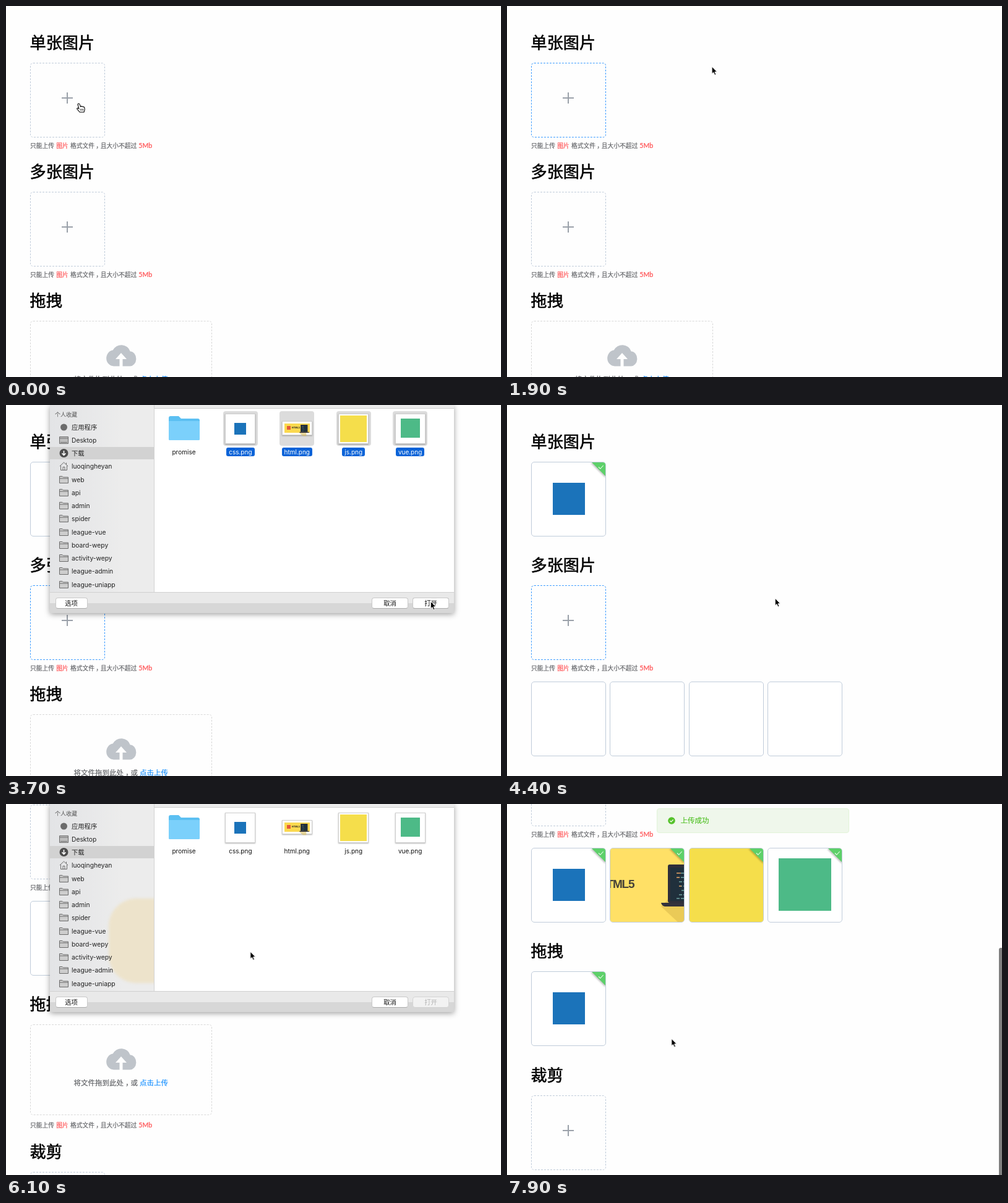
An HTML page for the animation above (8000 ms loop, 800 by 601 pixels).

```html
<!DOCTYPE html>
<html lang="zh">
<head>
<meta charset="utf-8">
<title>图片上传</title>
<style>
  html, body { margin: 0; width: 100%; height: 100%; overflow: hidden; background: #fefefe; }
  * { box-sizing: border-box; }
  #stage { position: relative; width: 800px; height: 601px; overflow: hidden;
    font-family: Lato, "Noto Sans CJK SC", "Noto Sans CJK", sans-serif; color: #606266; }
  #stage div, #stage svg, h1, p { position: absolute; margin: 0; white-space: nowrap; }
  #stage svg { overflow: visible; }

  /* every timeline shares one 8 s loop */
  .anim { animation: 8s step-end infinite both; }
  .smooth { animation: 8s ease-in-out infinite both; }

  /* page */
  h1 { left: 38.5px; font: 400 26.2px/30px "Noto Sans CJK SC", "Noto Sans CJK", sans-serif;
    color: #000; -webkit-text-stroke: .6px #000; }
  .tip, .hint, .msg { -webkit-text-stroke: .2px currentColor; }
  .tip { left: 39px; font-size: 9.75px; line-height: 14px; word-spacing: .7px; }
  .tip b { font-weight: 400; color: #ff4d4f; }
  .tip b:last-child { font-size: 10.6px; }
  .comma { position: relative; left: .25em; font-style: normal; }
  .box { left: 39px; width: 121px; height: 121px; border: 1px dashed #c0ccda; border-radius: 5px; }
  .box::before, .box::after { content: ""; position: absolute; background: #9ba1aa; }
  .box::before { left: 50px; top: 55px; width: 18px; height: 2px; }
  .box::after { left: 58px; top: 47px; width: 2px; height: 18px; }
  .drop::before, .drop::after { display: none; }
  .drop { width: 294px; height: 147px; border-color: #d9d9d9; }
  .box.blue { border-color: #409eff; background: #fefefe; }
  .hint { left: 109.5px; font-size: 11.5px; line-height: 16px; }
  .hint a { color: #1890ff; }
  .card { width: 121px; height: 121px; border: 1px solid #c0ccda; border-radius: 5px;
    background: #fff; overflow: hidden; }
  .pic { inset: 0; }
  .mark { background: #1b73ba; }
  #bar { left: 795px; top: 0; width: 7px; height: 375px; border-radius: 3px; background: #7f7f7f; }

  /* messages */
  .msg { left: 242px; width: 311px; height: 40px; border: 1px solid #e1f3d8; border-radius: 4px;
    background: #eff7eb; color: #55c22b; font-size: 11.5px; line-height: 38px; padding-left: 37.5px; }
  .msg svg { left: 17px; top: 13px; }

  /* file dialog */
  #dialog { left: 71px; top: 0; width: 653px; height: 337px; background: #fff;
    box-shadow: 0 2px 9px rgba(0,0,0,.38); color: #222;
    font-family: Inter, "Noto Sans CJK SC", "Noto Sans CJK", sans-serif; }
  #side { left: 0; top: 0; width: 169px; height: 303px; overflow: hidden; font-size: 10.3px;
    background: linear-gradient(90deg, #e3e4e6, #ececec 70%); border-right: 1px solid #d2d2d2; }
  #glow { left: 95px; top: 153px; width: 120px; height: 137px; border-radius: 45px;
    background: #ede3cb; filter: blur(2px); }
  .row { left: 0; width: 169px; height: 20px; line-height: 20px; padding-left: 35px; }
  .row svg { left: 15px; top: 3px; }
  .row.on { background: #d2d2d2; }
  #top { left: 169px; top: 0; width: 484px; height: 6px; background: #ebebeb; border-bottom: 1px solid #cfcfcf; }
  #foot { left: 0; top: 303px; width: 653px; height: 34px; border-top: 1px solid #d0d0d0;
    background: linear-gradient(#e9e9e9 50%, #d7d7d7 50%); }
  .btn { top: 8px; height: 18px; font-size: 10.3px; line-height: 17px; text-align: center; color: #111;
    background: #fff; border: 1px solid #c9c9c9; border-bottom-color: #adadad; border-radius: 4px; }
  .btn.off { color: #b4b4b4; background: #f2f2f2; border-color: #d4d4d4; }
  .file { top: 10px; width: 56px; height: 76px; }
  .name { left: -12px; top: 58px; width: 80px; text-align: center; font-size: 10px; line-height: 16px; color: #111; }
  .shade { left: 0; top: 0; width: 56px; height: 56px; border-radius: 4px; background: #dcdcdc; }
  .name i { font-style: normal; padding: 1px 4px; border-radius: 3px; background: #0b63d8; color: #fff; }
  .frame { background: #fff; border: 1px solid #cfcfcf; box-shadow: 0 1px 2px rgba(0,0,0,.3); }
  #lasso { right: 2px; bottom: 227px; background: rgba(120,120,120,.18); border: 1px solid rgba(130,130,130,.5); }

  @keyframes scroll {
    0%, 58.1% { transform: translateY(0); }
    62.5% { transform: translateY(-230px); }
    67.4%, 91.9% { transform: translateY(-291px); }
    98%, 100% { transform: translateY(-377px); }
  }
  @keyframes barMove {
    0%, 58.1% { transform: translateY(0); opacity: 0; }
    58.4% { opacity: 1; }
    62.5% { transform: translateY(140px); }
    67.4% { transform: translateY(178px); opacity: 1; }
    71% { opacity: 0; }
    91.9% { transform: translateY(178px); opacity: 0; }
    92.5% { opacity: 1; }
    98%, 100% { transform: translateY(233px); opacity: 1; }
  }
  @keyframes untilSingle { 0% { opacity: 1; } 24.4%, 100% { opacity: 0; } }
  @keyframes fromSingle { 0% { opacity: 0; } 24.4%, 100% { opacity: 1; } }
  @keyframes singlePic { 0% { opacity: 0; } 26.9%, 100% { opacity: 1; } }
  @keyframes singleBlue { 0% { opacity: 0; } 1.9% { opacity: 1; } 6.9% { opacity: 0; } 20.6% { opacity: 1; } 24.4%, 100% { opacity: 0; } }
  @keyframes multiShift { 0% { transform: none; } 24.4%, 100% { transform: translateY(-9px); } }
  @keyframes multiBlue { 0% { opacity: 0; } 28.1% { opacity: 1; } 33.1% { opacity: 0; } 41.9% { opacity: 1; } 71.9%, 100% { opacity: 0; } }
  @keyframes multiCards { 0% { opacity: 0; } 51.9%, 100% { opacity: 1; } }
  @keyframes multiPics { 0% { opacity: 0; } 58.1%, 100% { opacity: 1; } }
  @keyframes dragShift { 0% { transform: translateY(-138px); } 24.4% { transform: translateY(-147px); } 51.9%, 100% { transform: none; } }
  @keyframes dragBlue { 0% { opacity: 0; } 70% { opacity: 1; } 74.4% { opacity: 0; } 85.6% { opacity: 1; } 91.9%, 100% { opacity: 0; } }
  @keyframes untilDrag { 0% { opacity: 1; } 91.9%, 100% { opacity: 0; } }
  @keyframes fromDrag { 0% { opacity: 0; } 91.9%, 100% { opacity: 1; } }
  @keyframes dragPic { 0% { opacity: 0; } 94.4%, 100% { opacity: 1; } }
  @keyframes cropShift { 0% { transform: none; } 91.9%, 100% { transform: translateY(-38px); } }

  @keyframes msgSingle {
    0%, 26.9% { transform: translateY(-39px); opacity: 0; }
    30%, 46% { transform: none; opacity: 1; }
    47%, 100% { transform: none; opacity: 0; }
  }
  @keyframes msgMulti {
    0%, 57.8% { transform: translateY(-39px); opacity: 0; }
    61.5%, 80% { transform: none; opacity: 1; }
    81%, 100% { transform: none; opacity: 0; }
  }
  @keyframes msgDrag {
    0%, 96.25% { transform: translateY(-39px); opacity: 0; animation-timing-function: linear; }
    98.75% { transform: translateY(-9px); opacity: 1; }
    99.5%, 100% { transform: none; opacity: 1; }
  }

  @keyframes sheet {
    0%, 5.6%, 21.25%, 30.6%, 50.6%, 71.9%, 88.1%, 100% { transform: translateY(-352px); }
    9.4%, 18.1%, 33.7%, 47.5%, 75.4%, 85% { transform: none; }
  }
  @keyframes glow { 0% { opacity: 0; } 62%, 100% { opacity: 1; } }
  @keyframes pickFirst {
    0% { opacity: 0; } 15.6% { opacity: 1; } 22% { opacity: 0; } 42.5% { opacity: 1; }
    51.5% { opacity: 0; } 80.6% { opacity: 1; } 89%, 100% { opacity: 0; }
  }
  @keyframes pickRest { 0% { opacity: 0; } 38.8% { opacity: 1; } 51.5%, 100% { opacity: 0; } }
  @keyframes lasso {
    0%, 38.2% { width: 0; height: 0; opacity: 0; }
    38.5% { width: 0; height: 0; opacity: 1; }
    43.1% { width: 380px; height: 104px; opacity: 1; }
    43.8%, 100% { width: 380px; height: 104px; opacity: 0; }
  }

  @keyframes pointer {
    0%, 6.25% { transform: translate(118px, 158px); }
    12.5% { transform: translate(413.5px, 51.5px); }
    15%, 21.9% { transform: translate(380px, 42px); }
    28.1%, 32.5% { transform: translate(118px, 340px); }
    36.25% { transform: translate(549px, 191px); }
    38.4% { transform: translate(721px, 109px); }
    43.1% { transform: translate(343px, 6px); }
    46.2%, 47.5% { transform: translate(686px, 318px); }
    55% { transform: translate(433px, 313px); }
    62.5%, 67.5% { transform: translate(409px, 336px); }
    70%, 72.5% { transform: translate(240px, 452px); }
    76.25% { transform: translate(394.5px, 239px); }
    80%, 81.2% { transform: translate(378px, 40px); }
    84%, 85.6% { transform: translate(684px, 318px); }
    95%, 100% { transform: translate(265.5px, 380px); }
  }
  @keyframes hand { 0% { opacity: 1; } 6.3% { opacity: 0; } 28% { opacity: 1; } 32.6% { opacity: 0; } 70% { opacity: 1; } 72.6%, 100% { opacity: 0; } }
  @keyframes arrow { 0% { opacity: 0; } 6.3% { opacity: 1; } 28% { opacity: 0; } 32.6% { opacity: 1; } 70% { opacity: 0; } 72.6%, 100% { opacity: 1; } }
</style>
</head>
<body>
<div id="stage"></div>
<script>
  const anim = name => `style="animation-name:${name}"`;
  const wrap = (name, inner) => `<div class="anim" ${anim(name)}>${inner}</div>`;
  const at = (x, y, w, h, extra = '') => `style="left:${x}px;top:${y}px;width:${w}px;height:${h}px;${extra}"`;

  const comma = '<i class="comma">，</i>';
  const title = (text, mid) => `<h1 style="top:${mid - 16.5}px">${text}</h1>`;
  const tip = mid => `<p class="tip" style="top:${mid - 7}px">只能上传 <b>图片</b> 格式文件${comma}且大小不超过 <b>5Mb</b></p>`;
  const box = (y, blue, kind = '') => `<div class="box ${kind}" style="top:${y}px"></div>` +
    (blue ? `<div class="box blue ${kind} anim" style="top:${y}px;animation-name:${blue}"></div>` : '');

  const laptop = (x, y, k) => `<svg width="1" height="1" style="left:${x}px;top:${y}px">
    <g transform="scale(${k})">
      <path d="M0 68 30 96 60 96 60 5z" fill="#d9b94c" opacity=".55"/>
      <rect x="11" width="60" height="62" rx="3" fill="#2f2f3a"/>
      <rect x="15" y="5" width="52" height="54" fill="#20303c"/>
      <path d="M0 62H84V64Q82 68 78 68H6Q1 67 0 62z" fill="#33323c"/>
      <path d="M25 14h16M25 21h12M29 28h14M29 35h9M33 42h12M29 49h8M25 55h12" stroke="#6fa3a0" stroke-width="1.6" stroke-dasharray="5 2"/>
      <path d="M25 14h7M25 21h5M29 35h4" stroke="#d98a4e" stroke-width="1.6"/>
    </g></svg>`;

  const pics = {
    css: `<div class="mark" ${at(34, 33, 52, 52)}></div>`,
    html: `<div class="pic" style="background:#ffe066"></div>
      <p style="right:81px;top:46px;font:700 19px/24px 'Liberation Sans',sans-serif;letter-spacing:-1.2px;color:#474338">HTML5</p>${laptop(82, 26, 1)}`,
    js: '<div class="pic" style="background:#f5de4b"></div>',
    vue: `<div ${at(17, 16, 85, 85, 'background:#4dba87')}></div>`
  };
  const corner = `<svg width="24" height="24" style="right:-1px;top:-1px;filter:drop-shadow(-1px 2px 1px rgba(0,0,0,.22))">
    <path d="M0 0H24V24z" fill="#5dd069"/><path d="M12 8.5 14.8 11.3 19.6 6" fill="none" stroke="#e8ffe8" stroke-width="1.1"/></svg>`;
  const card = (x, y, kind, load) => `<div class="card" style="left:${x}px;top:${y}px">
    <div class="pic anim" ${anim(load)}>${pics[kind]}${corner}</div></div>`;

  const cloud = `<svg width="48" height="37" style="left:162px;top:685px">
    <path d="M38.7 12.5A15 14.5 0 0 0 10.7 10.6 12 13 0 0 0 12 36.5H38A10 12 0 0 0 38.7 12.5z" fill="#bfc4ca"/>
    <path d="M24 15 33 25H26.5V37H21.5V25H15z" fill="#fefefe"/></svg>`;

  const page = `<div class="smooth" ${anim('scroll')}>
    ${title('单张图片', 59)}
    ${wrap('untilSingle', box(92, 'singleBlue') + tip(225.5))}
    ${wrap('fromSingle', card(39, 92, 'css', 'singlePic'))}
    ${wrap('multiShift', title('多张图片', 268) + box(301, 'multiBlue') + tip(434.5) +
      wrap('multiCards', Object.keys(pics).map((k, i) => card(39 + 127.3 * i, 457, k, 'multiPics')).join('')))}
    ${wrap('dragShift', title('拖拽', 615) +
      wrap('untilDrag', box(648, 'dragBlue', 'drop') + cloud +
        `<p class="hint" style="top:735px">将文件拖到此处${comma}或 <a>点击上传</a></p>` + tip(811)) +
      wrap('fromDrag', card(39, 648, 'css', 'dragPic')) +
      wrap('cropShift', title('裁剪', 854) + box(887)))}
  </div>`;

  const msg = (y, name) => `<div class="msg smooth" style="top:${y}px;animation-name:${name}">
    <svg width="12" height="12"><circle cx="6" cy="6" r="5.8" fill="#55c22b"/>
    <path d="M3.4 6.2 5.3 8 8.7 4.4" fill="none" stroke="#fff" stroke-width="1.2"/></svg>上传成功</div>`;
  const messages = msg(16, 'msgSingle') +
    [0, 1, 2, 3].map(i => msg(16 + 52.2 * i, 'msgMulti')).join('') + msg(16, 'msgDrag');

  const icon = body => `<svg width="15" height="14" fill="none" stroke="#6c6c6c">${body}</svg>`;
  const folder = icon('<path d="M.5 12.5V1.5H5L6.5 3H14.5V12.5zM.5 5H14.5" fill="#cdcdcd"/>');
  const rows = [
    ['应用程序', icon('<circle cx="7.5" cy="7" r="5.5" fill="#6c6c6c" stroke="none"/>')],
    ['Desktop', icon('<path d="M.5 1.5H14.5V12.5H.5z" fill="#bdbdbd"/><path d="M1 4H14M2 10.5H13"/>')],
    ['下载', icon('<circle cx="7.5" cy="7" r="7" fill="#4c4c4c" stroke="none"/><path d="M7.5 3V10M4.5 7.2 7.5 10.4 10.5 7.2" stroke="#fff" stroke-width="1.6"/>')],
    ['luoqingheyan', icon('<path d="M.8 7.2 7.5 1 14.2 7.2M2.5 6.5V13.5H12.5V6.5M6 13V8.5H9V13M11.5 4V1.5"/>')],
    ...['web', 'api', 'admin', 'spider', 'league-vue', 'board-wepy', 'activity-wepy', 'league-admin', 'league-uniapp']
      .map(name => [name, folder])
  ].map(([name, pic], i) =>
    `<div class="row ${i === 2 ? 'on' : ''}" style="top:${25.7 + 21.25 * i}px">${pic}${name}</div>`).join('');

  const frame = inner => `<div class="frame" ${at(3.5, 3.5, 49, 49)}>${inner}</div>`;
  const files = [
    ['promise', `<svg width="50" height="40" style="left:3px;top:8px"><path d="M0 3Q0 0 3 0H16L20 4H47Q50 4 50 7V37Q50 39 48 39H2Q0 39 0 37z" fill="#5cc0f2"/>
      <path d="M0 8H50V37Q50 39 48 39H2Q0 39 0 37z" fill="#7bd0fb"/></svg>`],
    ['css.png', frame(`<div class="mark" ${at(14, 14, 19, 19)}></div>`), 'pickFirst'],
    ['html.png', `<div class="frame" ${at(3.5, 16, 49, 23)}><div ${at(3, 3, 41, 15, 'background:#fbd94f')}>
      <div ${at(4, 4, 6, 6, 'background:#e5593a')}></div>
      <p style="left:12px;top:3px;font:700 4px/8px 'Liberation Sans',sans-serif">HTML5</p>${laptop(24, 2, .19)}</div></div>`, 'pickRest', 3],
    ['js.png', frame(`<div ${at(2, 2, 43, 43, 'background:#f5de4b')}></div>`), 'pickRest', 2],
    ['vue.png', frame(`<div ${at(8, 7, 31, 31, 'background:#4dba87')}></div>`), 'pickRest', 0]
  ].map(([name, pic, pick, step = 0], i) => {
    const on = `style="animation-name:${pick};animation-delay:${step * 90}ms"`;
    return `<div class="file" style="left:${188.5 + 91.4 * i}px">
      ${pick ? `<div class="shade anim" ${on}></div>` : ''}${pic}<div class="name">${name}</div>
      ${pick ? `<div class="name anim" ${on}><i>${name}</i></div>` : ''}</div>`;
  }).join('');

  const btn = (x, w, text, cls = '', style = '') =>
    `<div class="btn ${cls}" style="left:${x}px;width:${w}px;${style}">${text}</div>`;
  const dialog = `<div id="dialog" class="smooth" ${anim('sheet')}>
    <div id="side"><div id="glow" class="anim" ${anim('glow')}></div>
      <p style="left:8px;top:9px;font-size:9px;line-height:14px;color:#555">个人收藏</p>${rows}</div>
    <div id="top"></div>${files}
    <div id="lasso" class="smooth" ${anim('lasso')}></div>
    <div id="foot">${btn(8.5, 52, '选项')}${btn(520, 59, '取消')}${btn(586, 59, '打开', 'off')}
      ${btn(586, 59, '打开', 'anim', 'animation-name:pickFirst')}${btn(586, 59, '打开', 'anim', 'animation-name:pickRest')}</div>
  </div>`;

  const pointer = `<div class="smooth" ${anim('pointer')}>
    <svg class="anim" width="10" height="15" ${anim('arrow')}>
      <path d="M.3 0V12L3 9.5 5 14 7 13.1 5.1 8.8H8.7z" fill="#000" stroke="#fff" stroke-width=".9"/></svg>
    <svg class="anim" width="14" height="15" ${anim('hand')}>
      <path d="M-2 1.5Q-2 0 -.5 0 .6 0 1.2 1.6L2.4 5Q3.8 3.8 4.6 5 6 4.2 6.7 5.5 8.6 5 9 7.4L9.2 10 8 14H1.2L-3.2 8.8Q-3.6 7.2 -1.8 7.4L-.2 8.4z" fill="#fff" stroke="#000" stroke-width="1.1"/>
      <path d="M2.4 8.5V11.5M4.5 8.5V11.5M6.5 8.5V11.5" stroke="#000" stroke-width=".8"/></svg>
  </div>`;

  document.getElementById('stage').innerHTML =
    page + messages + `<div id="bar" class="smooth" ${anim('barMove')}></div>` + dialog + pointer;
</script>
</body>
</html>
```
